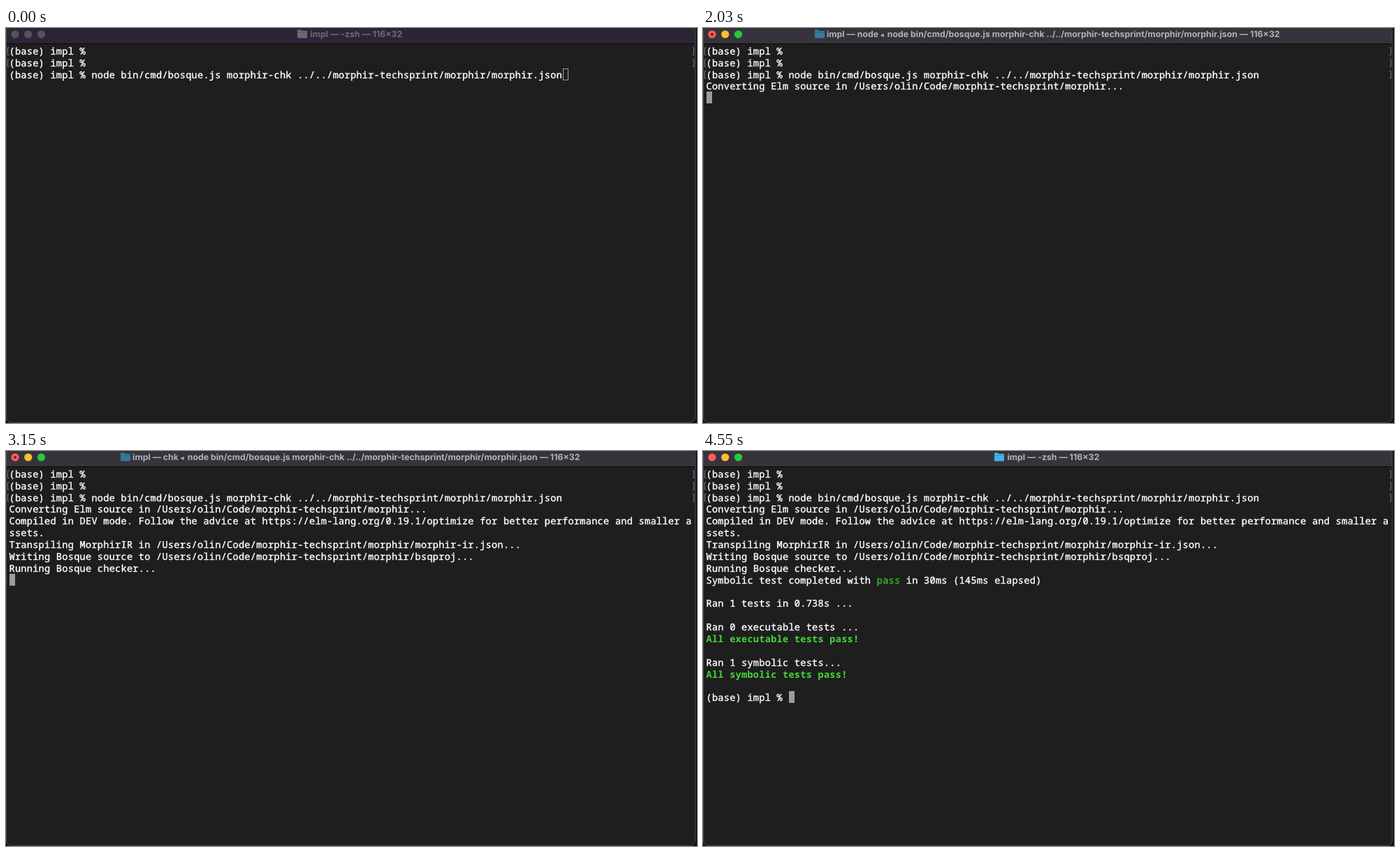
Recreate the animation shown at these times as an HTML page. Size 989 by 566 pixels, loop 5.81 s.

```html
<!DOCTYPE html>
<html lang="en">
<head>
<meta charset="utf-8">
<title>Terminal run</title>
<style>
  html, body { margin: 0; width: 100%; height: 100%; overflow: hidden; background: #120c20; }
  svg { display: block; width: 100vw; height: 100vh; }
  text { white-space: pre; text-rendering: geometricPrecision; }
  #screen text {
    font: 500 13.6px "Noto Sans Mono", "DejaVu Sans Mono", monospace;
    letter-spacing: .265px;
    fill: #fff;
    stroke: #fff;
    stroke-width: .4px;
  }
  #screen .pass { fill: #35b92d; stroke: #35b92d; }
  #screen .bold { fill: #43d63a; stroke: none; font-weight: 700; }
  #title { font: 700 12.3px Inter, "Liberation Sans", sans-serif; text-anchor: middle; }
  #title .arrow { font-size: 9px; letter-spacing: 2.500px; }
</style>
</head>
<body>
<svg viewBox="0 0 989 566" preserveAspectRatio="none">
  <defs>
    <clipPath id="frame"><rect x="0" y="-4" width="987" height="570" rx="8"/></clipPath>
  </defs>
  <g clip-path="url(#frame)">
    <rect width="987" height="566" fill="#1e1e1e"/>
    <rect id="bar" width="987" height="22"/>
    <rect y="22" width="987" height="1" fill="#0b0a0c"/>
  </g>
  <rect x=".5" y="-3.5" width="986" height="569" rx="8" fill="none" stroke="#4b4a4e"/>
  <g id="lights"></g>
  <circle id="busy" cx="13" cy="9" r="2" fill="#7d1610"/>
  <g id="icon">
    <path d="M0 3.8q0-1.2 1.2-1.2h3.6l1.5 1.4h6.5q1.2 0 1.2 1.2v8q0 1.2-1.2 1.2h-11.6q-1.2 0-1.2-1.2z"/>
    <path d="M0 6.3h14" stroke="#000" stroke-opacity=".22" stroke-width=".8"/>
  </g>
  <text id="title" x="501.3" y="13.4"></text>
  <g id="screen"></g>
  <g id="pointer" fill="none" stroke-linecap="round">
    <path d="M831 152q3 0 3 2.5v10q0 2.5-3 2.5M837 152q-3 0-3 2.5v10q0 2.5 3 2.5M832.5 161h3" stroke="#fff" stroke-width="3"/>
    <path d="M831 152q3 0 3 2.5v10q0 2.5-3 2.5M837 152q-3 0-3 2.5v10q0 2.5 3 2.5M832.5 161h3" stroke="#111" stroke-width="1.2"/>
  </g>
</svg>
<script>
const LOOP = 5810;
const LEFT = 4.5, TOP = 23.4, COL = 8.425, ROW = 16.86;
const $ = id => document.getElementById(id);

const prompt = '(base) impl % ';
const command = 'node bin/cmd/bosque.js morphir-chk ../../morphir-techsprint/morphir/morphir.json';
const home = '/Users/olin/Code/morphir-techsprint/morphir';
const lines = [
  prompt,
  prompt,
  prompt + command,
  `Converting Elm source in ${home}...`,
  'Compiled in DEV mode. Follow the advice at https://elm-lang.org/0.19.1/optimize for better performance and smaller a',
  'ssets.',
  `Transpiling MorphirIR in ${home}/morphir-ir.json...`,
  `Writing Bosque source to ${home}/bsqproj...`,
  'Running Bosque checker...',
  'Symbolic test completed with <tspan class="pass">pass</tspan> in 30ms (145ms elapsed)',
  '',
  'Ran 1 tests in 0.738s ...',
  '',
  'Ran 0 executable tests ...',
  '<tspan class="bold">All executable tests pass!</tspan>',
  '',
  'Ran 1 symbolic tests...',
  '<tspan class="bold">All symbolic tests pass!</tspan>',
  '',
  prompt
];

const child = name => `${name} <tspan class="arrow">◂</tspan> ${command}`;
const titles = {
  shell: { text: '-zsh', icon: 417 },
  run: { text: command, icon: 181.5 },
  node: { text: child('node'), icon: 160 },
  chk: { text: child('chk'), icon: 164 }
};

// start time, title, rows shown, cursor column
const steps = [
  [0, 'shell', 3, 94],
  [630, 'shell', 3, 94],
  [1750, 'shell', 3, 0],
  [1820, 'run', 3, 0],
  [1960, 'run', 4, 0],
  [2030, 'node', 4, 0],
  [2450, 'node', 9, 0],
  [2520, 'run', 9, 0],
  [3150, 'chk', 9, 0],
  [3220, 'run', 10, 0],
  [3290, 'run', 18, 0],
  [3360, 'shell', 20, 14]
];

function bracketPair(row) {
  const y = TOP + row * ROW + 4.6;
  return `<path d="M4.5 ${y}h-2v10.5h2M982.5 ${y}h2v10.5h-2" fill="none" stroke="#77777a"/>`;
}

// The cursor sits on whole pixels so its edges stay sharp.
function cursor(row, col, focused) {
  const x = Math.ceil(LEFT + col * COL), y = Math.ceil(TOP + row * ROW);
  return focused
    ? `<rect x="${x}" y="${y}" width="8" height="17" fill="#9c9c9c"/>`
    : `<rect x="${x + .5}" y="${y + .5}" width="7" height="16" fill="none" stroke="#9c9c9c"/>`;
}

function draw(step) {
  const [start, name, rows, col] = step;
  const focused = start > 0, busy = name !== 'shell';
  const title = titles[name];

  $('bar').setAttribute('fill', focused ? '#37333c' : '#2d2535');
  const colors = focused ? ['#fe5f57', '#febc2e', '#28c840'] : Array(3).fill('#57525c');
  $('lights').innerHTML = colors.map((c, i) =>
    `<circle cx="${13 + i * 18.75}" cy="9" r="5.6" fill="${c}"/>`).join('');
  $('busy').style.display = busy ? '' : 'none';
  $('icon').setAttribute('transform', `translate(${title.icon} 0)`);
  $('icon').setAttribute('fill', !focused ? '#6c6a6e' : busy ? '#36799b' : '#3fb6ee');
  $('title').setAttribute('fill', focused ? '#b5b1b8' : '#706a76');
  $('title').innerHTML = `impl — ${title.text} — 116×32`;

  const entered = start >= 1750;
  const cursorRow = col ? rows - 1 : rows;
  let html = cursor(cursorRow, col, focused);
  for (let i = 0; i < (entered ? 3 : 2); i++) html += bracketPair(i);
  lines.slice(0, rows).forEach((line, i) => {
    html += `<text x="${LEFT}" y="${TOP + i * ROW + 14.5}">${line}</text>`;
  });
  $('screen').innerHTML = html;
}

let shown;
function update(now) {
  const t = now % LOOP;
  const step = steps.filter(s => s[0] <= t).pop();
  if (step !== shown) draw(shown = step);
  $('pointer').style.display = t >= 4060 && t < 4130 ? '' : 'none';
}

const begin = performance.now();
function tick() {
  update(performance.now() - begin);
  requestAnimationFrame(tick);
}
tick();
</script>
</body>
</html>
```
